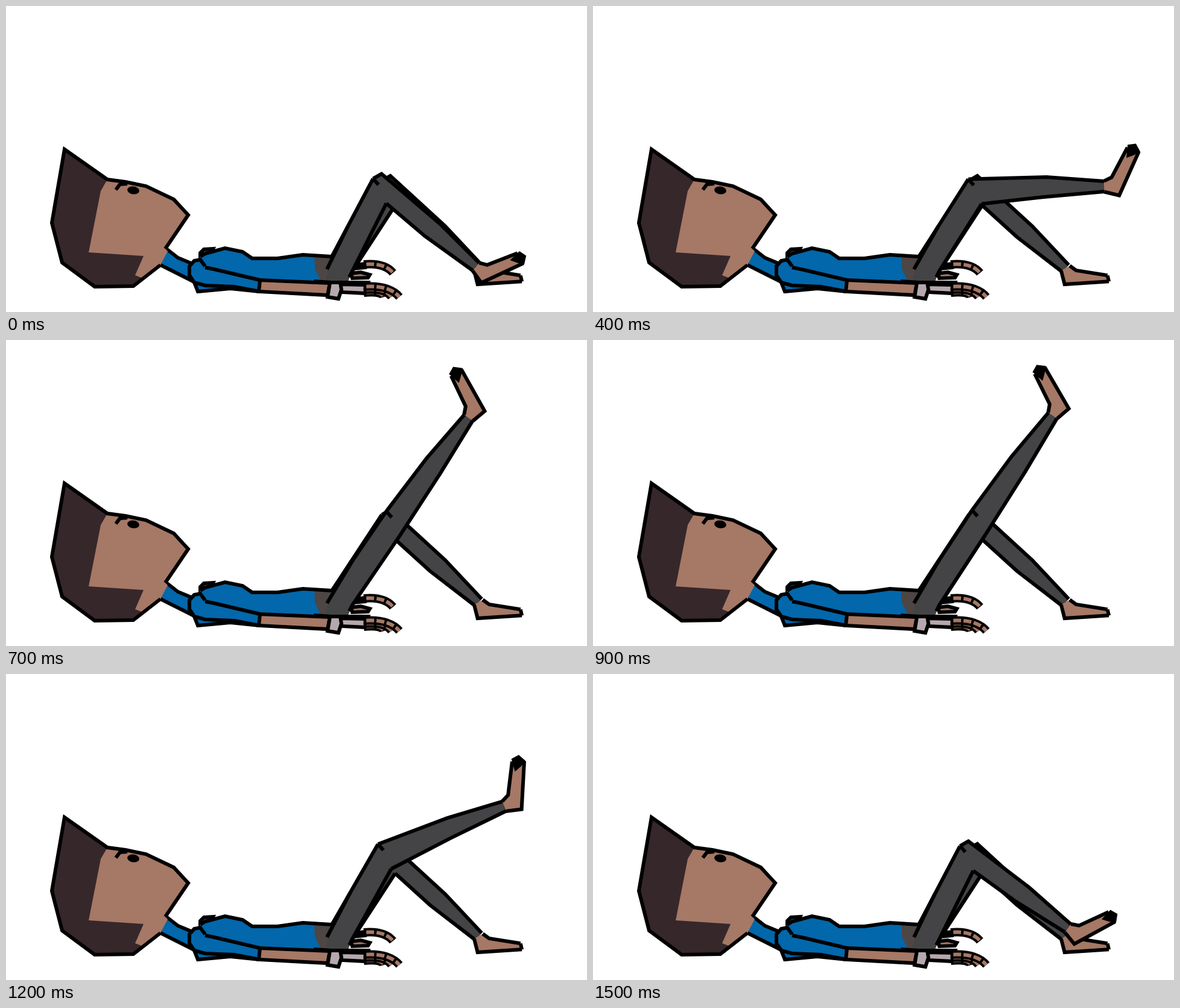
These frames come from a looping animation (963 px wide and 508 px high, 1600 ms). An HTML page with a canvas:

```html
<!DOCTYPE html>
<html lang="en">
<head>
<meta charset="utf-8">
<title>Leg raise</title>
<style>
html, body { margin: 0; width: 100%; height: 100%; overflow: hidden; background: #fff; }
canvas { display: block; }
</style>
</head>
<body>
<canvas id="stage" width="963" height="508"></canvas>
<script>
const ctx = document.getElementById('stage').getContext('2d');
const LOOP = 1600, STEP = 100, INK_WIDTH = 6;
const BLUE = '#0267ab', SKIN = '#a67866', HAIR = '#36272a', GREY = '#444345',
      HIP = '#4d4644', CUFF = '#b5a9ae', INK = '#000';

function trace(p) {
  ctx.beginPath();
  for (let i = 0; i < p.length; i += 2) ctx.lineTo(p[i], p[i + 1]);
}

function fill(color, ...p) {
  trace(p);
  ctx.fillStyle = color;
  ctx.fill();
}

function stroke(color, width) {
  ctx.strokeStyle = color;
  ctx.lineWidth = width;
  ctx.stroke();
}

function line(...p) {
  trace(p);
  stroke(INK, INK_WIDTH);
}

function shape(color, ...p) {
  fill(color, ...p);
  ctx.closePath();
  stroke(INK, INK_WIDTH);
}

// Returns a mapper from limb coordinates to stage coordinates
function placer(x, y, degrees, scale) {
  const a = degrees * Math.PI / 180;
  const c = Math.cos(a) * scale, s = Math.sin(a) * scale;
  return (...p) => p.map((v, i) => i % 2
    ? y + p[i - 1] * s + v * c
    : x + v * c - p[i + 1] * s);
}

function foot(ankle, degrees, scale, curled) {
  const at = placer(...ankle, degrees, scale);
  const top = [8, -5, 19, 4, 75, curled ? 7 : 16];
  const sole = [77, 27, -3, 28, -8, 3];
  fill(SKIN, ...at(...top, ...sole));
  line(...at(...top));
  line(...at(...sole));
  if (curled) shape(INK, ...at(78, 9, 83, 17, 77, 25, 70, 20, 64, 14));
  else line(...at(...top.slice(-2), ...sole.slice(0, 2)));
}

function leg({ x, y, angle, scale, footAngle, curled }) {
  const at = placer(x, y, angle, scale);
  const cap = [x - 14, y - 17], pit = [x + 8, y + 24];
  const hip = [539, 418], seat = [574, 440];
  const along = t => hip.map((v, i) => v + (cap[i] - v) * t);
  const peak = angle > 15 ? [x, y - 25] : [];
  const shinTop = [...cap, ...peak, ...at(116, -18, 212, -9)];
  const shinBottom = [...pit, ...at(109, 15, 212, 8)];

  fill(GREY, 529, 459, ...hip, ...cap, x, y, ...pit, ...seat, 566, 459);
  line(...hip, ...cap);
  line(532, 437, ...along(0.4));
  line(569, 450, ...seat, ...pit);
  fill(GREY, ...shinTop, ...at(212, 8, 109, 15), ...pit);
  line(...shinTop);
  line(...shinBottom);
  line(...cap, x - 5, y - 7);
  foot(at(212, 0), footAngle, scale, curled);
}

// Bent fingers fanned below one another, with dashes for the joints
function hand(x, y, fingers, reach) {
  ctx.lineCap = 'butt';
  for (let i = fingers - 1; i >= 0; i--) {
    ctx.beginPath();
    ctx.moveTo(x, y + 5 * i);
    ctx.quadraticCurveTo(x + (42 - 6 * i) * reach, y - 3 + 5 * i,
      x + (59 - 13 * i) * reach, y + 17 * reach);
    stroke(INK, 14);
    stroke(SKIN, 6);
    ctx.setLineDash([4, 13]);
    stroke(INK, 8);
    ctx.setLineDash([]);
  }
}

function head() {
  shape(BLUE, 262, 400, 285, 418, 314, 430, 308, 456, 254, 429);
  const face = [264, 403, 302, 347, 278, 321, 232, 299, 198, 292, 168, 288];
  const skull = [...face, 97, 238, 76, 360, 93, 426, 147, 466, 211, 465, 256, 430];
  fill(HAIR, ...skull);
  fill(SKIN, ...face, 157, 307, 137, 409, 228, 415, 214, 447, 227, 452, 256, 430, 268, 407);
  line(...skull);
  line(182, 305, 189, 296, 201, 295);
  ctx.beginPath();
  ctx.ellipse(211, 306, 10, 6.5, 0.15, 0, Math.PI * 2);
  ctx.fillStyle = INK;
  ctx.fill();
}

function torso() {
  shape(BLUE, 322, 420, 322, 410, 328, 404, 343, 403, 335, 418);
  const front = [322, 416, 330, 411, 363, 402, 392, 408, 408, 419, 450, 419, 492, 413, 540, 416];
  fill(BLUE, ...front, 532, 459, 420, 460, 318, 474, 306, 440);
  fill(HIP, 511, 415, 540, 416, 535, 459, 522, 457, 512, 436);
  line(...front);
}

function farHand() {
  shape(SKIN, 572, 444, 588, 442, 603, 446, 600, 451, 574, 452);
  shape(CUFF, 576, 430, 595, 428, 595, 434, 577, 436);
  hand(593, 429, 1, 0.82);
}

function nearArm() {
  const shoulder = [312, 459, 304, 447, 304, 432, 312, 423, 322, 421, 330, 432];
  const sleeve = [420, 474, 372, 469, 318, 474];
  fill(BLUE, ...sleeve, ...shoulder, 345, 437, 421, 455);
  line(...sleeve, ...shoulder);
  line(330, 434, 345, 437, 421, 455);
  line(312, 459, 330, 464, 378, 466, 420, 474);
  line(510, 457, 540, 459, 604, 459);
  shape(SKIN, 421, 455, 537, 460, 533, 480, 419, 474);
  shape(CUFF, 555, 462, 596, 463, 596, 477, 555, 475);
  shape(CUFF, 537, 459, 554, 459, 556, 471, 551, 486, 533, 483);
  hand(593, 466, 3, 1);
}

// Low harmonics make the quick lift, the pause at the top and the soft landing
function nearPose(phase) {
  const wave = (size, n, shift) => size * Math.cos(n * phase - shift);
  const angle = -9.6 + wave(53.8, 1, 0.16) + wave(2.6, 2, 0.65) - wave(6.2, 3, 0.31);
  return {
    x: 633.3 - wave(11.2, 1, -0.25),
    y: 302 + 3 * Math.sin(phase + 0.6),
    angle,
    scale: 1 - 0.06 * Math.max(0, Math.sin(angle * Math.PI / 180)),
    footAngle: angle - 64,
    curled: true
  };
}

const FAR_POSE = { x: 637, y: 307, angle: 41.5, scale: 0.92, footAngle: -3, curled: false };

function render(now) {
  const phase = Math.floor(now % LOOP / STEP) * STEP / LOOP * Math.PI * 2;
  ctx.fillStyle = '#fff';
  ctx.fillRect(0, 0, 963, 508);
  ctx.miterLimit = 3;
  farHand();
  leg(FAR_POSE);
  torso();
  head();
  leg(nearPose(phase));
  nearArm();
}

const start = performance.now();
function tick() {
  render(performance.now() - start);
  requestAnimationFrame(tick);
}
tick();
</script>
</body>
</html>
```
